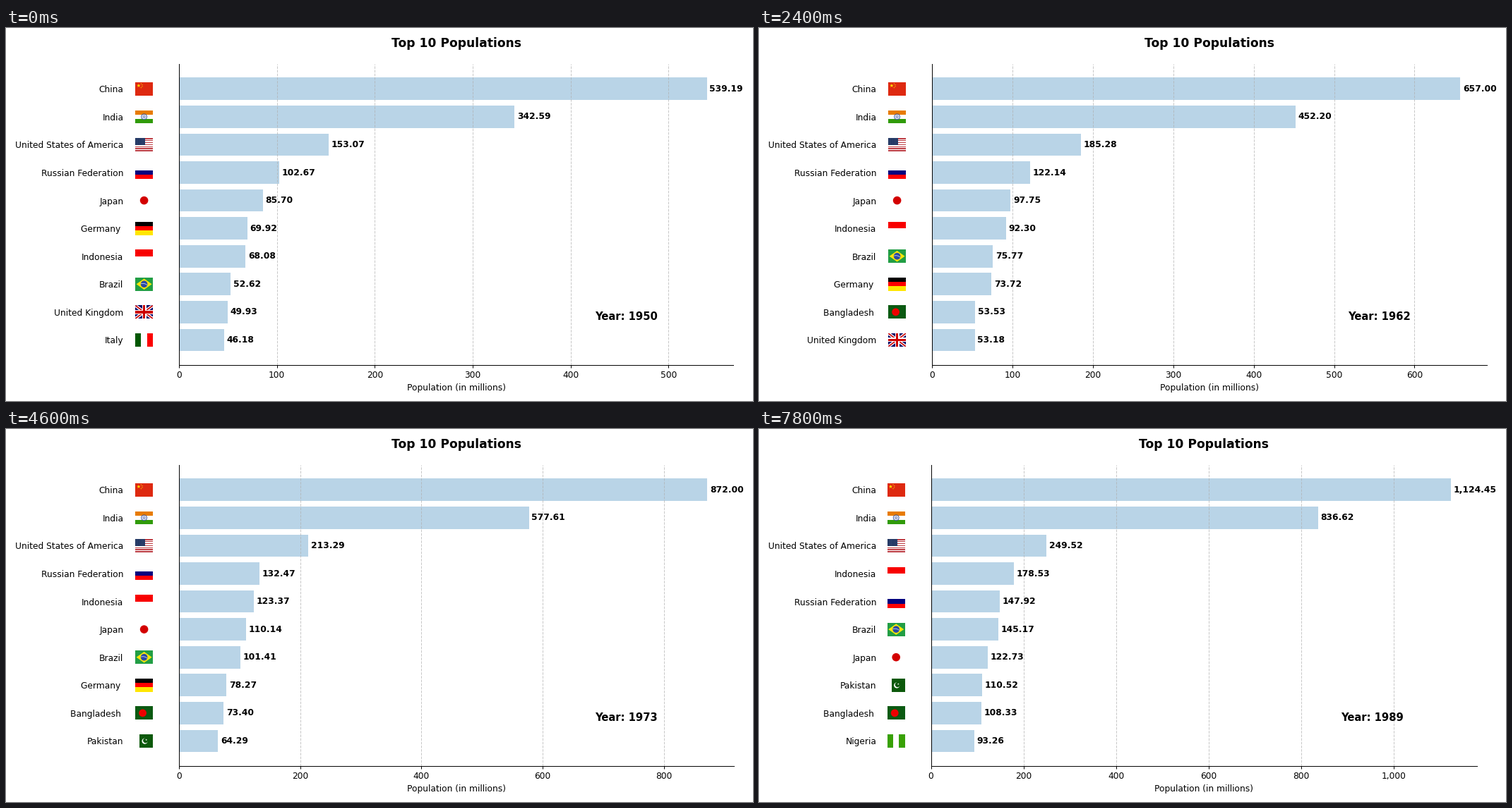
Animation of 1058 by 529 pixels, one loop 8000 ms. Source, as a matplotlib script:

```python
import numpy as np
import matplotlib.pyplot as plt
from matplotlib.animation import FuncAnimation
from matplotlib.patches import Circle, Polygon, Rectangle
from matplotlib.transforms import Affine2D

W, H = 1058, 529
FIRST, COUNT, ROWS = 1950, 40, 10
TOP, BOTTOM = 51.1, 477.6
BAR = "#b9d4e7"

YEARS = [1950, 1958, 1965, 1969, 1977, 1983, 1989]
CHINA_YEARS = [1950, 1954, 1958, 1960, 1961, 1962, 1963, 1965,
               1969, 1973, 1977, 1980, 1983, 1986, 1989]
MILLIONS = {
    "China": [539.19, 583.5, 637.93, 655, 654.5, 657, 672, 713.79,
              791.73, 872, 937.26, 977, 1021.97, 1067, 1124.45],
    "India": [342.59, 410.79, 484.80, 528.22, 633.22, 728.70, 836.62],
    "United States of America": [153.07, 172.85, 194.30, 204.14, 222.19, 235.79, 249.52],
    "Russian Federation": [102.67, 115.66, 126.17, 129.42, 135.56, 140.74, 147.92],
    "Japan": [85.70, 94.46, 100.37, 104.86, 115.06, 119.72, 122.73],
    "Germany ": [69.92, 71.41, 75.59, 77.58, 78.24, 77.9, 78.5],
    "Indonesia": [68.08, 82.47, 100.26, 110.96, 136.84, 157.85, 178.53],
    "Brazil": [52.62, 67.05, 82.65, 91.89, 111.53, 128.35, 145.17],
    "United Kingdom": [49.93, 51.79, 54.19, 55.2, 56.1, 56.3, 57],
    "Italy": [46.18, 48.79, 51.6, 53, 55.7, 56.6, 56.8],
    "Bangladesh ": [38.6, 46.9, 59.03, 66.36, 80.86, 94.09, 108.33],
    "Pakistan": [37, 44.2, 51.6, 57.62, 72.73, 90.70, 110.52],
    "Nigeria": [36.8, 42.8, 49.8, 54.7, 66.9, 79.55, 93.26],
}


def smooth(t, xs, ys):
    """Cubic Hermite curve through the given points."""
    xs, ys = np.array(xs, float), np.array(ys, float)
    slope = np.gradient(ys, xs)
    k = min(np.searchsorted(xs, t, side="right") - 1, len(xs) - 2)
    h = xs[k + 1] - xs[k]
    u = (t - xs[k]) / h
    return ((1 + 2 * u) * (1 - u) ** 2 * ys[k] + u * (1 - u) ** 2 * h * slope[k]
            + u * u * (3 - 2 * u) * ys[k + 1] + u * u * (u - 1) * h * slope[k + 1])


def ranking(year):
    table = [(smooth(year, CHINA_YEARS if name == "China" else YEARS, ys), name)
             for name, ys in MILLIONS.items()]
    return sorted(table, reverse=True)[:ROWS]


# Flags, centred on the origin with y pointing down.
FW, FH = 25, 18.75
X0, Y0 = -FW / 2, -FH / 2


def box(x, y, w, h, color):
    return Rectangle((x, y), w, h, fc=color, lw=0)


def disc(x, y, r, color):
    return Circle((x, y), r, fc=color, lw=0)


def shape(points, color):
    return Polygon(points, fc=color, lw=0)


def star(x, y, r, color):
    a = np.arange(10) * np.pi / 5
    rad = np.where(np.arange(10) % 2, 0.38 * r, r)
    return shape(np.c_[x + rad * np.sin(a), y - rad * np.cos(a)], color)


def rows(*colors):
    h = FH / len(colors)
    return [box(X0, Y0 + i * h, FW, h, c) for i, c in enumerate(colors)]


def columns(*colors):
    w = FW / len(colors)
    return [box(X0 + i * w, Y0, w, FH, c) for i, c in enumerate(colors)]


def field(color):
    return box(X0, Y0, FW, FH, color)


def diagonal(side, w, color):
    a, b = w, w * FH / FW
    pts = np.array([(X0, Y0), (X0 + a, Y0), (-X0, -Y0 - b),
                    (-X0, -Y0), (-X0 - a, -Y0), (X0, Y0 + b)])
    return shape(pts * (side, 1), color)


def cross(w, color):
    return [box(X0, -w / 2, FW, w, color), box(-w / 2, Y0, w, FH, color)]


def china():
    small = [(-4.2, -7.4), (-2.6, -5.7), (-2.6, -3.4), (-4.2, -1.7)]
    return ([field("#de2910"), star(-7.7, -4.6, 2.9, "#ffde00")]
            + [star(x, y, 1, "#ffde00") for x, y in small])


def india():
    wheel = Circle((0, 0), 3.9, fc="none", ec="#3d58a8", lw=0.8)
    hub = Circle((0, 0), 1.7, fc="#c5cde4", ec="#6f82bd", lw=0.7)
    return rows("#e77b00", "white", "#309b09") + [wheel, hub]


def usa():
    stripes = rows(*["#bd3d44" if i % 2 == 0 else "white" for i in range(13)])
    canton = box(X0, Y0, 14, FH * 7 / 13, "#192f5d")
    dots = [disc(X0 + 1.4 + 2.25 * i, Y0 + 1.3 + 1.9 * j, 0.4, "#8e9bb5")
            for i in range(6) for j in range(5)]
    return stripes + [canton] + dots


def brazil():
    t = np.linspace(-1, 1, 9)
    arc = np.c_[4.4 * t, 0.9 * t + 1.2 * t * t - 1.2]
    band = np.r_[arc, arc[::-1] + (0, 0.8)]
    return [field("#229e45"),
            shape([(-11, 0), (0, -7.8), (11, 0), (0, 7.8)], "#f8e509"),
            disc(0, 0, 4.8, "#2b49a3"), shape(band, "#dfe6ee")]


def britain():
    return ([field("#000066")]
            + [diagonal(s, 3.6, "white") for s in (1, -1)]
            + [diagonal(s, 1.4, "#cc0000") for s in (1, -1)]
            + cross(6.2, "white") + cross(3.75, "#cc0000"))


def pakistan():
    green = "#0c590b"
    return [box(-6.25, Y0, 18.75, FH, green), disc(1, 0.2, 4.1, "white"),
            disc(2.1, -0.7, 3.6, green), star(3.1, -1.6, 1.5, "white")]


FLAGS = {
    "China": china(),
    "India": india(),
    "United States of America": usa(),
    "Russian Federation": rows("white", "#01017e", "#fe0101"),
    "Japan": [disc(0, 0, 5.8, "#d30000")],
    "Germany ": rows("#000000", "#ff0000", "#ffe600"),
    "Indonesia": rows("#f80000", "white"),
    "Brazil": brazil(),
    "United Kingdom": britain(),
    "Italy": columns("#005700", "white", "#fc0000"),
    "Bangladesh ": [field("#0b5a12"), disc(-2, 0, 5.4, "#ee0000")],
    "Pakistan": pakistan(),
    "Nigeria": columns("#38a105", "white", "#38a105"),
}

fig = plt.figure(figsize=(12, 6), dpi=H / 6, facecolor="white")
ax = fig.add_axes([0.2, 0.1, 0.7, 0.8])
ax.spines[["top", "right"]].set_visible(False)
ax.set_title("Top 10 Populations", fontsize=14, fontweight="bold", pad=20)
ax.set_xlabel("Population (in millions)")
ax.set_ylim(-0.89, 9.89)
ax.set_yticks([])
ax.xaxis.set_major_formatter("{x:,.0f}")
ax.grid(axis="x", linestyle="--", alpha=0.7)

levels = np.arange(ROWS)[::-1]
bars = ax.barh(levels, np.ones(ROWS), color=BAR)
values = [ax.annotate("", (0, y), (3, 0), textcoords="offset points",
                      va="center", fontweight="bold") for y in levels]
year_text = ax.text(0.75, 0.15, "", transform=ax.transAxes,
                    fontsize=12, fontweight="bold")

# Layer in pixel units for country names and flags.
layer = fig.add_axes([0, 0, 1, 1], zorder=2)
layer.set_xlim(0, W)
layer.set_ylim(H, 0)
layer.axis("off")

pitch = (BOTTOM - TOP) / 10.78
row_y = TOP + pitch * (0.89 + np.arange(ROWS))
names = [layer.text(166.4, y, "", ha="right", va="center_baseline") for y in row_y]

places = {}
for country, parts in FLAGS.items():
    places[country] = Affine2D()
    for z, part in enumerate(parts):
        part.set(transform=places[country] + layer.transData, zorder=1 + z * 0.01)
        layer.add_artist(part)


def draw(i):
    table = ranking(FIRST + i)
    top = table[0][0]
    left = 245 if top < 1000 else 243.6
    right = 1030 if top < 600 else 1030.8 if top < 1000 else 1017.2
    ax.set_position([left / W, 1 - BOTTOM / H, (right - left) / W, (BOTTOM - TOP) / H])
    ax.set_xlim(0, top * 1.05)
    year_text.set_text(f"Year: {FIRST + i}")

    for parts in FLAGS.values():
        for part in parts:
            part.set_visible(False)
    for k, (value, country) in enumerate(table):
        bars[k].set_width(value)
        values[k].xy = (value, levels[k])
        values[k].set_text(f"{value:,.2f}")
        names[k].set_text(country)
        places[country].clear().translate(left - 49.4, row_y[k])
        for part in FLAGS[country]:
            part.set_visible(True)
    return []


anim = FuncAnimation(fig, draw, frames=COUNT, interval=200, init_func=lambda: draw(0),
                     repeat=True, repeat_delay=0)
plt.show()
```
